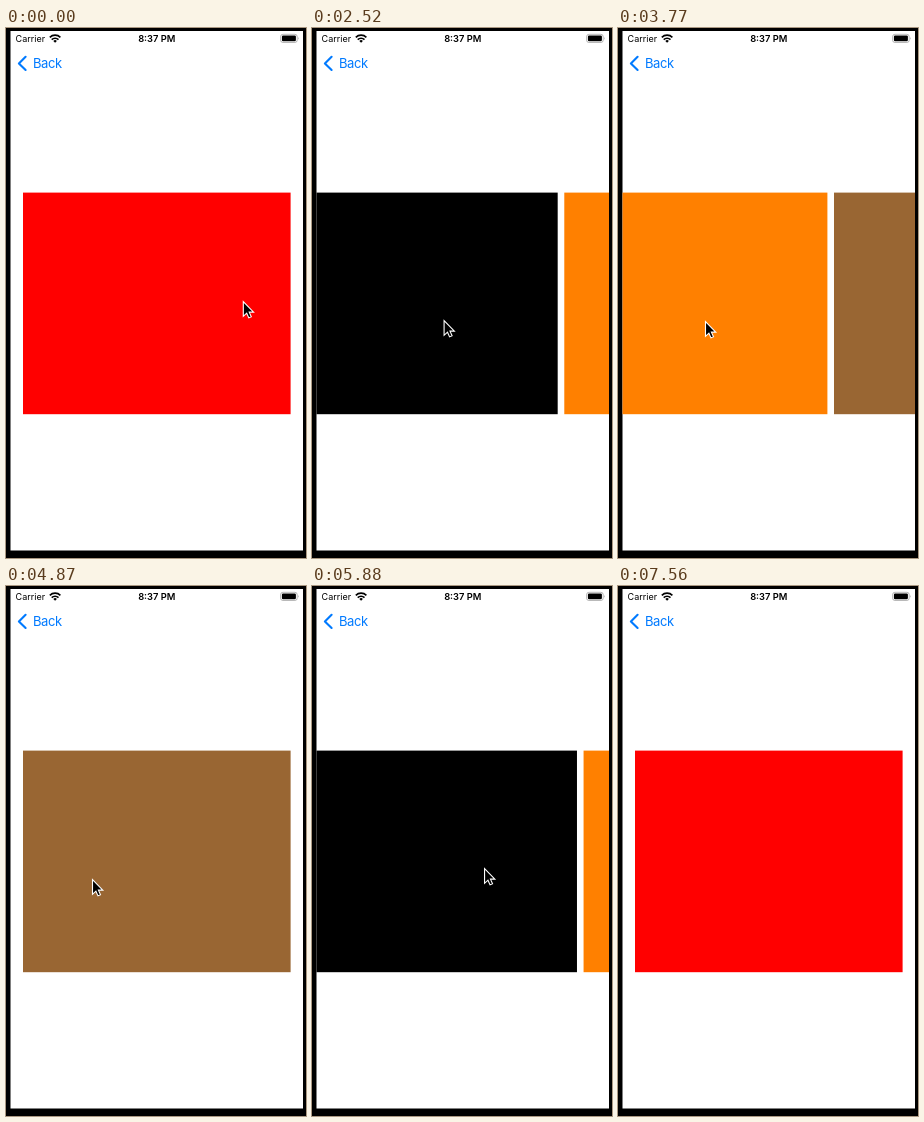
An HTML page that plays this animation: 300 px wide and 530 px high, repeating every 8040 ms.

```html
<!DOCTYPE html>
<html lang="en">
<head>
<meta charset="utf-8">
<title>Card carousel</title>
<style>
  html, body { margin: 0; height: 100%; overflow: hidden; background: #000; }
  svg { display: block; width: 100vw; height: 100vh; }
  text { font-family: Inter, "Open Sans", sans-serif; }
</style>
</head>
<body>
<svg viewBox="0 0 300 530">
  <clipPath id="screen"><rect x="4.5" y="3" width="292.5" height="519.5"/></clipPath>
  <rect width="300" height="530"/>
  <g clip-path="url(#screen)">
    <rect width="300" height="530" fill="#fff"/>
    <g id="cards"></g>
  </g>

  <text x="9.6" y="13.8" font-size="9">Carrier</text>
  <g fill="none" stroke="#000" stroke-width="1.6">
    <path d="M43.8 9.4a7.4 7.4 0 0 1 10.6 0"/>
    <path d="M45.7 11.6a4.8 4.8 0 0 1 6.8 0"/>
  </g>
  <path d="M49.1 14.8l-1.8-1.9a2.6 2.6 0 0 1 3.6 0z"/>
  <text x="150.8" y="13.8" font-size="9.36" font-weight="600" text-anchor="middle">8:37 PM</text>
  <g fill-opacity=".35">
    <rect x="274.6" y="6.3" width="16.6" height="8.2" rx="2.3" fill="none" stroke="#000" stroke-opacity=".35" stroke-width=".8"/>
    <path d="M292.2 9q1.4 1.4 0 2.8z"/>
  </g>
  <rect x="275.9" y="7.5" width="14" height="5.8" rx="1.2"/>

  <path d="M19.6 28.8L12.9 35.4L19.6 42" fill="none" stroke="#007aff" stroke-width="2.1" stroke-linecap="round" stroke-linejoin="round"/>
  <text x="27" y="40" font-size="13" letter-spacing="-.4" fill="#007aff">Back</text>

  <path id="cursor" d="M0 0V14.8L3.4 11.7L5.5 16.4L8 15.3L5.9 10.6H10.3Z" stroke="#fff" stroke-width="1.1"/>
</svg>
<script>
const LOOP = 8040, PITCH = 274.2;
const REACH = 73, SETTLE = 365;   // drag distance in px, page snap in ms
const START = { x: 237.3, y: 273.5 };
const PARK = { x: 245, y: 265.5 };

// Where and when the pointer grabs a card; three swipes forward, three back.
const grabs = [
  { at: 1500, x: 206.5, y: 284.5 },
  { at: 2385, x: 171, y: 292.5 },
  { at: 3390, x: 160.5, y: 293.5 },
  { at: 4875, x: 86.5, y: 293.5 },
  { at: 5550, x: 100, y: 282.5 },
  { at: 6320, x: 172, y: 282.5 }
];

const cards = document.getElementById('cards');
const cursor = document.getElementById('cursor');
cards.innerHTML = ['#f00', '#000', '#ff8000', '#963'].map(color =>
  `<rect y="164.6" width="267.6" height="221.6" fill="${color}"/>`).join('');

const ramp = (t, from, to) => Math.min(1, Math.max(0, (t - from) / (to - from)));

function pose(t) {
  const arrive = ramp(t, 270, 400);
  let x = START.x + (grabs[0].x - START.x) * arrive;
  let y = START.y + (grabs[0].y - START.y) * arrive;
  let scroll = 0;

  grabs.forEach((grab, i) => {
    const forward = i < 3;
    const step = forward ? -1 : 1;
    const release = grab.at + (forward ? 380 : 170);
    const drag = step * REACH * Math.sin(ramp(t, grab.at, release) * Math.PI / 2);
    const after = ramp(t, release, release + SETTLE);
    const next = grabs[i + 1] || PARK;

    scroll += drag + step * (PITCH - REACH) * (1 - (1 - after) ** 4);
    x += drag + (next.x - grab.x - step * REACH) * after;
    y += (next.y - grab.y) * after;
  });

  // The pointer drops to the bottom edge, waits and leaves the stage.
  y += 233 * ramp(t, 7170, 7350) + 34 * ramp(t, 7500, 7560);
  return { x, y, scroll };
}

const begin = performance.now();
function draw() {
  const { x, y, scroll } = pose((performance.now() - begin) % LOOP);
  [...cards.children].forEach((card, i) => {
    const shift = i * PITCH + scroll;
    card.setAttribute('x', 17 + shift);
    // Neighbours exist only while they overlap the page.
    card.style.display = Math.abs(shift) < PITCH - 0.5 ? '' : 'none';
  });
  cursor.setAttribute('transform', `translate(${x} ${y})`);
  requestAnimationFrame(draw);
}
draw();
</script>
</body>
</html>
```
